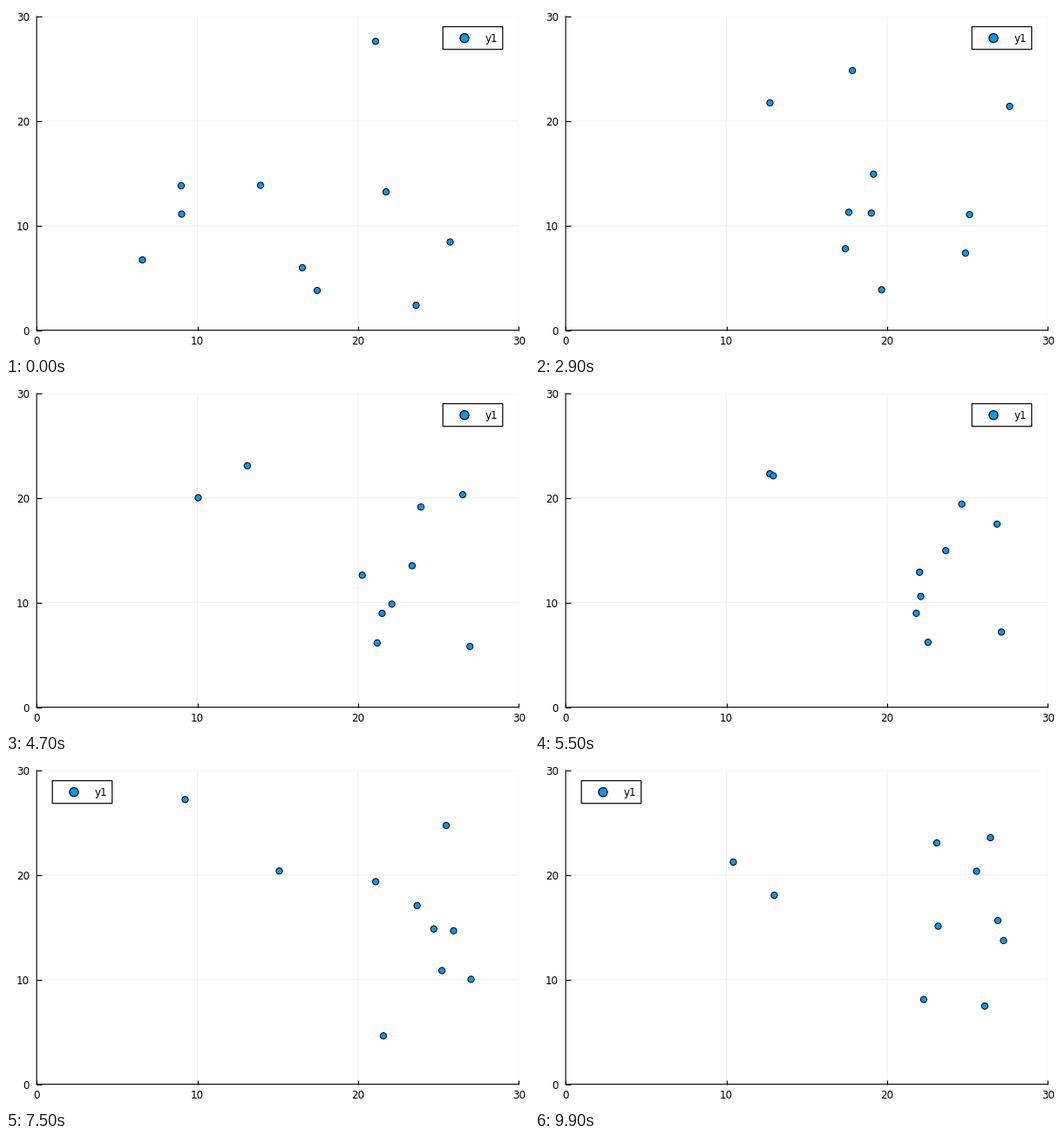
A matplotlib script that plays this animation: 600x400 px, repeating every 10000 ms.

```python
import numpy as np
import matplotlib.pyplot as plt
from matplotlib.animation import FuncAnimation
from matplotlib.patches import Circle, Rectangle

W, H, DPI = 600, 400, 100
PX = 72 / DPI  # points per pixel
LEFT, RIGHT, TOP, BOTTOM = 35.2, 588.2, 11.9, 371.6
BLUE = "#009AFA"
FRAMES, STEP = 100, 100
SWING, GOLDEN = 40, np.radians(137.5)

plt.rcParams.update({"font.family": "DejaVu Sans", "font.size": 8.6,
                     "path.snap": False})

# Drifting dots: first and last position in pixels.
DRIFTS = [((424, 40.5), (274.5, 155)), ((292, 205.5), (506.5, 127.5)),
          ((201.5, 238.5), (516, 282)), ((156.5, 291), (537.5, 207)),
          ((340, 300), (461, 95)), ((509.5, 270.5), (462.5, 190.5)),
          ((357, 326), (446, 274.5)), ((470.5, 343), (531, 184))]
# Two dots that roam through the upper corners and push the legend away.
ROAMERS = [
    {0: (201, 206), 16: (217, 163), 29: (269.5, 111), 47: (220.5, 131.5),
     64: (324.5, 72), 87: (96.5, 50), 99: (227.5, 117)},
    {0: (436, 213), 16: (486.5, 188.5), 22: (520, 75), 29: (544.5, 115),
     39: (525, 82), 47: (524, 128), 64: (531.5, 162), 75: (505, 75),
     87: (469.5, 51), 99: (522.5, 89)},
]


def drift(n, start, end, t):
    """Move to the end, fast at first in x, swinging along a fixed direction."""
    s = t / t[-1]
    ease = np.stack([1 - (1 - s) ** 2, s], axis=1)
    aim = np.array([np.cos(n * GOLDEN), np.sin(n * GOLDEN)])
    swing = SWING * np.sin(3 * np.pi * s)[:, None] * aim
    return start + ease * np.subtract(end, start) + swing


def roam(knots, t):
    """Cubic Hermite path through {step: (x, y)}."""
    ts = np.array(list(knots), float)
    ps = np.array(list(knots.values()))
    vs = np.gradient(ps, ts, axis=0)
    k = np.clip(np.searchsorted(ts, t, side="right") - 1, 0, len(ts) - 2)
    h = (ts[k + 1] - ts[k])[:, None]
    s = (t - ts[k])[:, None] / h
    return ((1 + 2 * s) * (1 - s) ** 2 * ps[k] + s * (1 - s) ** 2 * h * vs[k]
            + s ** 2 * (3 - 2 * s) * ps[k + 1] + s ** 2 * (s - 1) * h * vs[k + 1])


steps = np.arange(FRAMES)
paths = np.stack([drift(n, a, b, steps) for n, (a, b) in enumerate(DRIFTS)]
                 + [roam(knots, steps) for knots in ROAMERS])
paths = np.clip(paths, (76, 40), (547, 345))


def legend_shift(points):
    """Offset of the legend from the top right: first corner without points."""
    u = (points[:, 0] - LEFT) / (RIGHT - LEFT)
    v = (BOTTOM - points[:, 1]) / (BOTTOM - TOP)
    right, left, top, low = u > 0.75, u < 0.25, v > 0.75, v < 0.25
    corners = [(right & top, (0, 0)), (left & top, (-448, 0)),
               (right & low, (0, 310)), (left & low, (-448, 310))]
    return next((d for hit, d in corners if not hit.any()), (0, 0))


fig = plt.figure(figsize=(W / DPI, H / DPI), dpi=DPI, facecolor="white")

ax = fig.add_axes([LEFT / W, 1 - BOTTOM / H, (RIGHT - LEFT) / W, (BOTTOM - TOP) / H])
ax.set(xlim=(0, 30), ylim=(0, 30), xticks=range(0, 31, 10), yticks=range(0, 31, 10))
ax.spines[["top", "right"]].set_visible(False)
ax.spines[["left", "bottom"]].set_linewidth(1.1 * PX)
ax.tick_params(direction="in", length=5.5 * PX, width=1.1 * PX)
ax.tick_params(axis="x", pad=6.5 * PX)
ax.tick_params(axis="y", pad=8 * PX)
ax.grid(color="#f1f1f1", linewidth=1 * PX)
ax.set_axisbelow(True)

# Overlay in pixel units, y pointing down.
stage = fig.add_axes([0, 0, 1, 1])
stage.set(xlim=(0, W), ylim=(H, 0))
stage.axis("off")


def dot(radius, edge, z):
    return stage.add_patch(Circle((0, 0), radius, fc=BLUE, ec="black",
                                  lw=edge * PX, zorder=z))


dots = [dot(3.6, 1, 2) for _ in paths]
box = stage.add_patch(Rectangle((0, 0), 68.6, 26, fc="white", ec="black",
                                lw=1.2 * PX, zorder=3))
key = dot(5.1, 1.2, 4)
label = stage.text(0, 0, "y1", va="baseline", zorder=4)


def draw(i):
    points = paths[:, i]
    for d, p in zip(dots, points):
        d.center = p
    dx, dy = legend_shift(points)
    box.set_xy((501.2 + dx, 23.7 + dy))
    key.center = 526 + dx, 36.8 + dy
    label.set_position((550 + dx, 41 + dy))
    return *dots, box, key, label


anim = FuncAnimation(fig, draw, frames=FRAMES, interval=STEP, repeat=True,
                     repeat_delay=0, blit=False)
plt.show()
```
